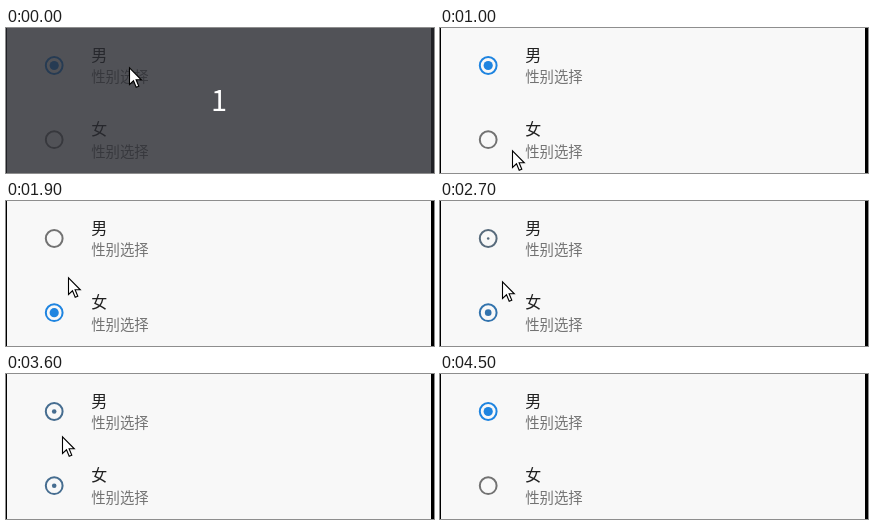
Animation, 428 px wide and 145 px high, one loop 5200 ms. Source, as an HTML page:

```html
<!DOCTYPE html>
<html lang="zh-CN">
<head>
<meta charset="utf-8">
<title>性别选择</title>
<style>
  html, body { margin: 0; width: 100%; height: 100%; overflow: hidden; background: #000; }
  svg { display: block; width: 100%; height: 100%; }
  text { font-family: "Noto Sans CJK SC", "Noto Sans CJK", sans-serif; }
  .title { font-size: 16px; font-weight: 300; fill: rgba(0, 0, 0, .87); }
  .sub { font-size: 14.4px; font-weight: 300; fill: rgba(0, 0, 0, .54); }
  .count { font-size: 29px; font-weight: 500; fill: #fff; text-anchor: middle; }
</style>
</head>
<body>
<svg viewBox="0 0 428 145">
  <rect x="1" width="424" height="145" fill="#f8f8f8"/>
  <g id="rows"></g>
  <g id="overlay">
    <rect width="428" height="145" fill="rgb(41, 42, 48)" fill-opacity=".8"/>
    <text class="count" x="213" y="83">1</text>
  </g>
  <path id="cursor" d="M.5 .8V17.5L4.5 13.8L7.2 20.3L9.8 19.2L7.1 12.8H12.3Z"
        fill="#fff" stroke="#000" stroke-width="1.1"/>
</svg>
<script>
const LOOP = 5200, STEP = 100;
const COUNT_END = 300, POINTER_END = 4500;
const BLUE = [30, 132, 224], FADE = 200, DOT = 4.6;
const HOME = { x: 123, y: 39 };

// Pointer trips, each eased out towards its stop
const trips = [
  { from: 300, to: 700, x: 64, y: 98 },
  { from: 800, to: 1000, x: 72, y: 122 },
  { from: 1200, to: 1500, x: 62, y: 113 },
  { from: 1830, to: 2060, x: 62, y: 50 },
  { from: 2600, to: 3000, x: 63, y: 111 },
  { from: 3340, to: 3800, x: 55, y: 54 },
  { from: 4100, to: 4400, x: 134, y: 12 }
];

// Each click swaps the chosen option
const clicks = [1360, 2645, 3500, 4100];

const $ = id => document.getElementById(id);
const lerp = (a, b, p) => a + (b - a) * p;
const progress = (t, from, to) => Math.max(0, Math.min(1, (t - from) / (to - from)));
const easeOut = p => 1 - (1 - p) ** 2.4;
const show = (id, on) => { $(id).style.display = on ? "" : "none"; };

function add(tag, parent, attrs, text = "") {
  const node = document.createElementNS("http://www.w3.org/2000/svg", tag);
  for (const k in attrs) node.setAttribute(k, attrs[k]);
  node.textContent = text;
  parent.append(node);
  return node;
}

function addRow(label, y) {
  const row = add("g", $("rows"), { transform: `translate(0 ${y})` });
  const centre = { cx: 48.2, cy: 37.5 };
  const ring = add("circle", row, { ...centre, r: 8.4, fill: "none", "stroke-width": 2 });
  const dot = add("circle", row, centre);
  add("text", row, { class: "title", x: 85.3, y: 33.2 }, label);
  add("text", row, { class: "sub", x: 85.2, y: 54.4 }, "性别选择");

  // Fades from translucent black to solid blue
  return p => {
    const color = `rgba(${BLUE.map(c => Math.round(c * p))}, ${lerp(.54, 1, p)})`;
    ring.setAttribute("stroke", color);
    dot.setAttribute("fill", color);
    dot.setAttribute("r", DOT * p);
  };
}

function pointerAt(t) {
  let { x, y } = HOME;
  for (const trip of trips) {
    const p = easeOut(progress(t, trip.from, trip.to));
    x = lerp(x, trip.x, p);
    y = lerp(y, trip.y, p);
  }
  return [Math.round(x), Math.round(y)];
}

// How far the first option is chosen, 0 to 1
const firstShare = t =>
  clicks.reduce((v, at, i) => lerp(v, i % 2, progress(t, at, at + FADE)), 1);

const setFirst = addRow("男", 0), setSecond = addRow("女", 74.2);

function draw(time) {
  const t = Math.floor(time / STEP) * STEP;
  const share = firstShare(t);
  setFirst(share);
  setSecond(1 - share);
  show("overlay", t < COUNT_END);
  show("cursor", t < POINTER_END);
  $("cursor").setAttribute("transform", `translate(${pointerAt(t)})`);
}

const begin = performance.now();
function tick() {
  draw((performance.now() - begin) % LOOP);
  requestAnimationFrame(tick);
}
tick();
</script>
</body>
</html>
```
